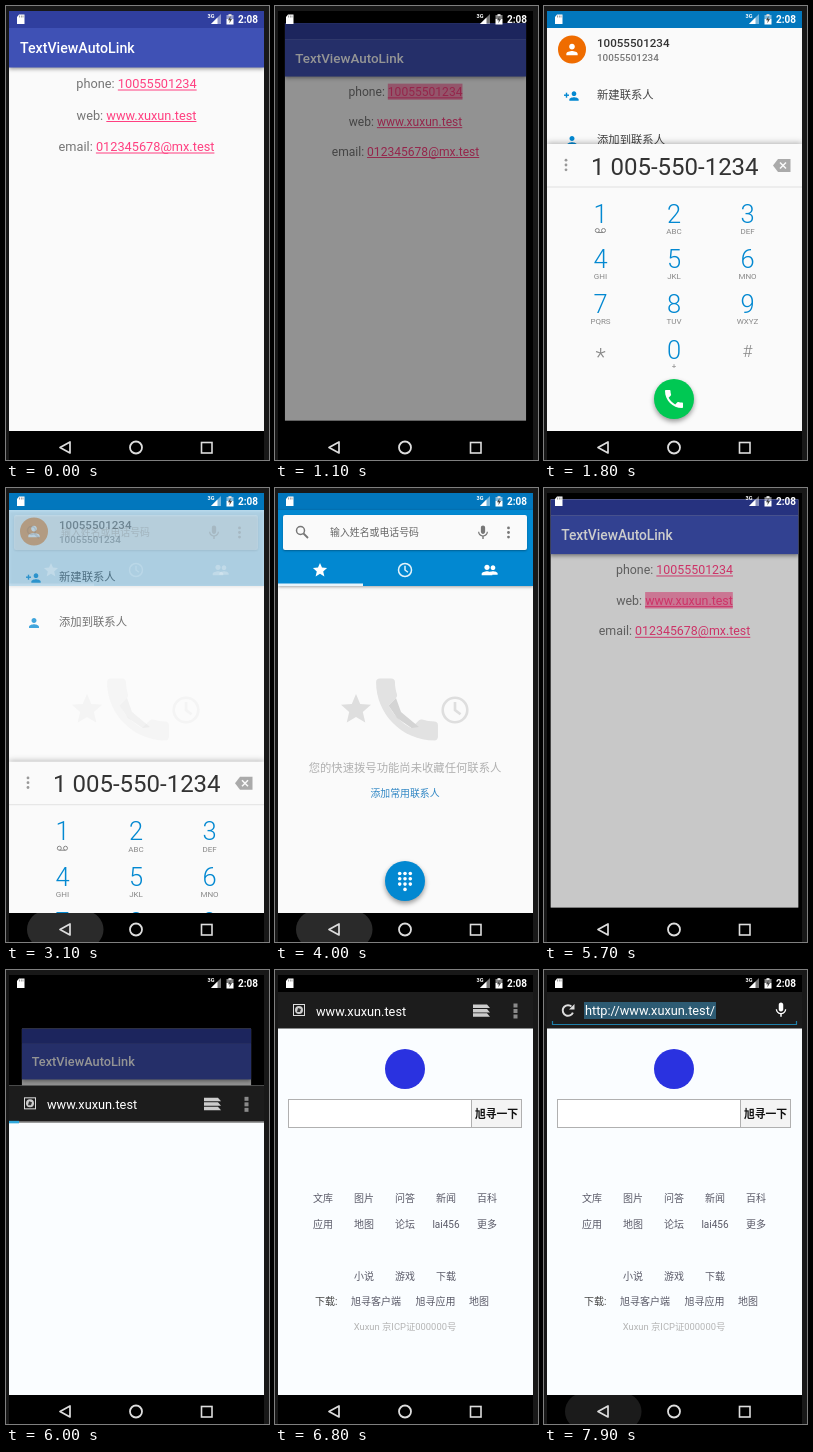
Recreate the animation shown at these times as an HTML page with a canvas. Size 263 px wide and 454 px high, loop 8 s.

```html
<!DOCTYPE html>
<html lang="zh">
<head>
<meta charset="utf-8">
<title>TextViewAutoLink</title>
<style>
html, body { margin: 0; width: 263px; height: 454px; overflow: hidden; background: #181818; }
canvas { display: block; width: 263px; height: 454px; }
</style>
</head>
<body>
<canvas id="stage"></canvas>
<script>
const W = 263, H = 454, LOOP = 8000, STEP = 100;
const FONT = 'Roboto, "Noto Sans CJK SC", "Noto Sans CJK", sans-serif';
const PHONE = '10055501234', PHONE_SPACED = '1 005-550-1234';
const SITE = 'www.xuxun.test', MAIL = '012345678@mx.test';
const BLUE = '#0288d1', PAPER = '#fafafa';

const canvas = document.getElementById('stage');
const c = canvas.getContext('2d');
const dpr = window.devicePixelRatio || 1;
canvas.width = W * dpr;
canvas.height = H * dpr;

// 24-unit icons
const ICON = {
  phone: new Path2D('M6.62 10.79c1.44 2.83 3.76 5.14 6.59 6.59l2.2-2.2c.27-.27.67-.36 1.02-.24 1.12.37 2.33.57 3.57.57.55 0 1 .45 1 1V20c0 .55-.45 1-1 1-9.39 0-17-7.61-17-17 0-.55.45-1 1-1h3.5c.55 0 1 .45 1 1 0 1.25.2 2.45.57 3.57.11.35.03.74-.25 1.02l-2.2 2.2z'),
  star: new Path2D('M12 17.27L18.18 21l-1.64-7.03L22 9.24l-7.19-.61L12 2 9.19 8.63 2 9.24l5.46 4.73L5.82 21z'),
  person: new Path2D('M12 12c2.21 0 4-1.79 4-4s-1.79-4-4-4-4 1.79-4 4 1.79 4 4 4zm0 2c-2.67 0-8 1.34-8 4v2h16v-2c0-2.66-5.33-4-8-4z'),
  mic: new Path2D('M12 14c1.66 0 3-1.34 3-3V5c0-1.66-1.34-3-3-3S9 3.34 9 5v6c0 1.66 1.34 3 3 3zm5.3-3c0 3-2.54 5.1-5.3 5.1S6.7 14 6.7 11H5c0 3.41 2.72 6.23 6 6.72V21h2v-3.28c3.28-.48 6-3.3 6-6.72h-1.7z')
};

const clamp = v => Math.max(0, Math.min(1, v));
const ramp = (t, a, b) => clamp((t - a) / (b - a));

function rect(x, y, w, h, fill) {
  c.fillStyle = fill;
  c.fillRect(x, y, w, h);
}
function disc(x, y, r, fill) {
  c.fillStyle = fill;
  c.beginPath();
  c.arc(x, y, r, 0, 7);
  c.fill();
}
function ring(x, y, r, color, width) {
  c.strokeStyle = color;
  c.lineWidth = width;
  c.beginPath();
  c.arc(x, y, r, 0, 7);
  c.stroke();
}
function poly(points, color, width, open) {
  c.beginPath();
  points.forEach(p => c.lineTo(p[0], p[1]));
  if (!open) c.closePath();
  if (width) {
    c.strokeStyle = color;
    c.lineWidth = width;
    c.stroke();
  } else {
    c.fillStyle = color;
    c.fill();
  }
}
function pill(x, y, w, h, r, fill) {
  c.fillStyle = fill;
  c.beginPath();
  c.roundRect(x, y, w, h, r);
  c.fill();
}
function text(s, x, y, size, color, weight = 400, align = 'left') {
  c.font = `${weight} ${size}px ${FONT}`;
  c.textAlign = align;
  c.fillStyle = color;
  c.fillText(s, x, y);
}
function label(s, x, y, size, color, weight) {
  text(s, x, y, size, color, weight, 'center');
}
function icon(name, x, y, size, color) {
  c.save();
  c.translate(x - size / 2, y - size / 2);
  c.scale(size / 24, size / 24);
  c.fillStyle = color;
  c.fill(ICON[name]);
  c.restore();
}
function shadow(color, blur, y, draw) {
  c.save();
  c.shadowColor = color;
  c.shadowBlur = blur * dpr;
  c.shadowOffsetY = y * dpr;
  draw();
  c.restore();
}
function dots(x, y, gap, r, color) {
  for (let i = -1; i < 2; i++) disc(x, y + i * gap, r, color);
}
function clock(x, y, r, color, width) {
  ring(x, y, r, color, width);
  poly([[x, y - r * .65], [x, y], [x + r * .45, y + r * .35]], color, width, true);
}
function faded(alpha, draw) {
  if (alpha <= 0) return;
  c.save();
  c.globalAlpha *= alpha;
  draw();
  c.restore();
}
function shifted(dy, draw) {
  c.save();
  c.translate(0, dy);
  draw();
  c.restore();
}

function linkLine(name, link, y, lit) {
  c.font = `400 12.75px ${FONT}`;
  const lead = c.measureText(name).width, w = c.measureText(link).width;
  const x = 130.5 - (lead + w) / 2;
  if (lit) rect(x + lead, y - 13, w, 17, 'rgba(255,64,129,.55)');
  text(name, x, y, 12.75, '#757575');
  text(link, x + lead, y, 12.75, '#ff4081');
  rect(x + lead, y + 1.5, w, 1, '#ff4081');
}

function linkApp(lit) {
  rect(3, 5, 255, 420, PAPER);
  shadow('rgba(0,0,0,.4)', 4, 1.5, () => rect(3, 22, 255, 39.5, '#3f51b5'));
  rect(3, 5, 255, 17, '#303f9f');
  text('TextViewAutoLink', 14, 47, 14.17, '#fff', 500);
  linkLine('phone: ', PHONE, 82, lit === 1);
  linkLine('web: ', SITE, 113.5, lit === 2);
  linkLine('email: ', MAIL, 145, false);
}

// The app seen behind another window: shrunk, lowered and darkened
function backApp(scale, dy, light, lit) {
  c.save();
  c.translate(130.5, 231 + dy);
  c.scale(scale, scale);
  c.translate(-130.5, -231);
  c.beginPath();
  c.rect(3, 5, 255, 420);
  c.clip();
  linkApp(lit);
  rect(3, 5, 255, 420, `rgba(0,0,0,${1 - light})`);
  c.restore();
}

function results() {
  rect(3, 22, 255, 403, PAPER);
  disc(28, 43.5, 14, '#ef6c00');
  icon('person', 28, 43.5, 17, '#fff');
  text(PHONE, 53, 41, 11.6, '#333', 500);
  text(PHONE, 53, 54.5, 9.9, '#777', 500);
  icon('person', 30, 90, 14, BLUE);
  rect(20, 88.5, 5, 1.4, BLUE);
  rect(21.8, 86.7, 1.4, 5, BLUE);
  text('新建联系人', 53, 93, 11.33, '#444');
  icon('person', 28, 135, 15, BLUE);
  text('添加到联系人', 53, 138, 11.33, '#444');
}

function fab(color, size = 1) {
  shadow('rgba(0,0,0,.4)', 5, 2.5, () => disc(130, 393, 20 * size, color));
}

function dialpad() {
  shadow('rgba(0,0,0,.3)', 6, -1, () => rect(3, 138, 255, 290, PAPER));
  dots(22, 159, 4.8, 1.4, '#999');
  text(PHONE_SPACED, 47, 168.5, 24, '#333');
  poly([[229, 159.5], [234, 153], [246.5, 153], [246.5, 166], [234, 166]], '#aaa');
  poly([[236, 156.5], [242, 162.5]], PAPER, 1.5);
  poly([[242, 156.5], [236, 162.5]], PAPER, 1.5);
  rect(3, 180.5, 255, 1, '#e2e2e2');

  const letters = ['', 'ABC', 'DEF', 'GHI', 'JKL', 'MNO', 'PQRS', 'TUV', 'WXYZ'];
  letters.forEach((s, i) => {
    const x = 56.5 + i % 3 * 73.5, y = 216.5 + Math.floor(i / 3) * 45.3;
    label(i + 1, x, y, 25.5, BLUE, 300);
    label(s, x, y + 11.3, 8, '#888');
  });
  ring(53.3, 224.5, 2, '#888', 1);
  ring(59.5, 224.5, 2, '#888', 1);
  rect(53.3, 226, 6.2, 1, '#888');
  label('*', 56.5, 359, 24, '#888', 300);
  label('0', 130, 352.5, 25.5, BLUE, 300);
  label('+', 130, 363, 8, '#888');
  label('#', 203.5, 351, 17, '#888', 300);
  fab('#00c853');
  icon('phone', 130, 393, 24, '#fff');
}

function favourites(fabSize) {
  rect(3, 22, 255, 403, PAPER);
  shadow('rgba(0,0,0,.35)', 3, 1, () => rect(3, 22, 255, 76, BLUE));
  shadow('rgba(0,0,0,.3)', 2, 1, () => pill(8, 27, 244, 35, 2, PAPER));
  ring(25.5, 42.5, 4, '#777', 1.5);
  poly([[28.5, 45.5], [33, 50]], '#777', 1.8, true);
  text('输入姓名或电话号码', 55, 48, 9.9, '#666');
  icon('mic', 208, 44.5, 17, '#777');
  dots(233.5, 44.5, 4.6, 1.4, '#777');

  icon('star', 45, 82, 17, '#fff');
  clock(130, 82, 6.5, '#e5f3fa', 1.5);
  icon('person', 218, 82, 14, '#fff');
  icon('person', 212, 82, 16, '#fff');
  rect(3, 95.5, 85, 2.5, '#e8f4fb');

  icon('star', 81, 221, 36, '#dedede');
  icon('phone', 132, 221.5, 82.5, '#e2e2e2');
  poly([[113.5, 217.5], [121, 210], [126, 224], [144, 239], [136.5, 240], [122, 230]], '#d4d4d4');
  clock(180, 222, 12.3, '#dedede', 2.6);
  label('您的快速拨号功能尚未收藏任何联系人', 130, 283.5, 11.33, '#b0b0b0');
  label('添加常用联系人', 130, 308.5, 9.9, '#2f86c4');

  if (fabSize <= 0) return;
  fab(BLUE, fabSize);
  for (let i = 0; i < 10; i++) {
    const col = i < 9 ? i % 3 - 1 : 0, row = Math.floor(i / 3);
    disc(130 + col * 5.3 * fabSize, 393 + (row * 5.3 - 7.5) * fabSize, 1.8 * fabSize, '#fff');
  }
}

function dialer(t) {
  rect(3, 5, 255, 17, '#0277bd');
  const drop = ramp(t, 2800, 3300);
  const swap = ramp(t, 3000, 3400);
  if (swap < 1) results();
  faded(swap, () => favourites(ramp(t, 3200, 3500)));
  if (drop < 1) {
    c.save();
    c.beginPath();
    c.rect(3, 22, 255, 403);
    c.clip();
    shifted(292 * drop ** 1.5, dialpad);
    c.restore();
  }
}

function page(t) {
  if (t >= 6700) disc(130, 99, 20, '#2a32e0');
  rect(13.5, 130, 183, 28, '#fff');
  rect(196.5, 130, 50, 28, '#f4f4f4');
  c.strokeStyle = '#b0b0b0';
  c.lineWidth = 1;
  c.strokeRect(13.5, 129.5, 183, 28);
  c.strokeRect(196.5, 129.5, 50, 28);
  label('旭寻一下', 221.5, 148, 10.8, '#111', 700);

  const row = (items, first, y) => items.split(' ').forEach((s, i) =>
    label(s, 48 + (first + i) * 41, y, 10, '#5a5a68'));
  row('文库 图片 问答 新闻 百科', 0, 231.5);
  row('应用 地图 论坛 lai456 更多', 0, 257.5);
  row('小说 游戏 下载', 1, 309.5);
  text('下载:', 40, 334.5, 10, '#444');
  text('旭寻客户端', 76, 334.5, 10, '#5a5a68');
  text('旭寻应用', 140.5, 334.5, 10, '#5a5a68');
  text('地图', 194, 334.5, 10, '#5a5a68');
  label('Xuxun 京ICP证000000号', 130, 359.5, 9.4, '#b4b4b4');
}

function typingBar() {
  c.strokeStyle = '#ddd';
  c.lineWidth = 2;
  c.beginPath();
  c.arc(24, 40.5, 5.3, .4, 5.4);
  c.stroke();
  poly([[25, 39.5], [30.5, 39.5], [30.5, 34]], '#ddd');
  rect(40, 32, 132, 17, '#2d5b73');
  text('http://' + SITE + '/', 41, 45, 12.75, '#fff');
  poly([[8.5, 51], [8.5, 54.5], [252.5, 54.5], [252.5, 51]], '#1f7fa8', 1.2, true);
  icon('mic', 237, 40, 18, '#fff');
}

function siteBar() {
  c.strokeStyle = '#ddd';
  c.lineWidth = 1;
  c.strokeRect(18.5, 34.5, 11, 11);
  disc(24, 40, 4, '#ccc');
  poly([[22, 42], [23, 38], [26, 39], [25, 42]], '#333');
  text(SITE, 41, 45.5, 12.75, '#fff');
  for (let i = 0; i < 3; i++) {
    const y = 34.5 + i * 4.4;
    poly([[198, y], [212, y], [215, y + 3.5], [198, y + 3.5]], '#ccc');
  }
  for (let i = 0; i < 3; i++) rect(238.5, 33.5 + i * 5.5, 4, 4, '#8a8a8a');
}

function browser(t) {
  rect(3, 22, 255, 403, '#fafdff');
  rect(3, 22, 255, 36.5, '#1c1c1c');
  if (t >= 7600) typingBar(); else siteBar();
  if (t < 6400) {
    rect(3, 58, 255, 1.5, '#888');
    rect(3, 57.5, 10 + 245 * ramp(t, 6000, 6400), 2.5, '#2fa8dc');
  }
  if (t >= 6600) page(t);
}

// A new window rises over the link app
function openOver(u, lit, draw) {
  const shrink = 1 - (1 - ramp(u, -100, 300)) ** 1.1;
  const sink = 31 * (Math.max(0, u - 100) / 200) ** 1.5;
  const light = u < 100 ? .8 : .58;
  backApp(1 - .1 * shrink, sink, light, lit);
  const rise = ramp(u, 100, 700);
  if (rise > 0) shifted(410 * (1 - rise) ** 3.65, draw);
}

// The dialer falls away and the link app comes back
function closeDialer(t) {
  const grow = 1 - .1 * (1 - ramp(t, 4100, 4900)) ** 1.5;
  backApp(grow, 0, .58 + .42 * ramp(t, 4700, 4900), 0);
  const fall = ramp(t, 4100, 4600);
  if (fall < 1) shifted(450 * fall ** 2, () => dialer(t));
}

function statusBar() {
  poly([[11, 11], [13, 8.5], [18.5, 8.5], [18.5, 18], [11, 18]], '#fff');
  for (let i = 0; i < 3; i++) rect(13.2 + i * 1.7, 9.5, .8, 2, '#888');
  text('3G', 201.5, 12, 5.5, '#fff', 700);
  poly([[205, 18], [215, 8], [215, 18]], 'rgba(255,255,255,.45)');
  poly([[205, 18], [211.5, 11.5], [211.5, 18]], '#fff');
  rect(222.5, 8, 3, 2, '#ccc');
  rect(220.5, 9, 7, 4, 'rgba(255,255,255,.5)');
  rect(220.5, 13, 7, 5.5, '#fff');
  poly([[224.6, 10], [222, 14.3], [223.8, 14.3], [223.4, 17.3], [226, 13], [224.2, 13]], '#444');
  text('2:08', 232, 17, 10, '#fff', 700);
}

function press(t, start, end, peak) {
  return peak * Math.min(ramp(t, start - 100, start + 200), 1 - ramp(t, end - 300, end));
}

function navBar(t) {
  rect(3, 425, 255, 29, '#000');
  const glow = press(t, 2800, 3500, .165) + press(t, 3800, 4600, .165) + press(t, 7600, 8600, .105);
  c.save();
  c.beginPath();
  c.rect(3, 425, 255, 29);
  c.clip();
  if (glow > 0) pill(21, 423, 76.5, 37, 18.5, `rgba(255,255,255,${glow})`);
  c.restore();
  c.lineJoin = 'round';
  poly([[54, 441.5], [64, 436], [64, 447]], '#ddd', 1.7);
  c.lineJoin = 'miter';
  ring(130, 441.5, 6, '#ddd', 1.8);
  c.strokeStyle = '#ddd';
  c.lineWidth = 1.6;
  c.strokeRect(195.5, 436.5, 10.5, 10.5);
}

function screen(t) {
  if (t < 1000) linkApp(t >= 700 ? 1 : 0);
  else if (t < 1700) openOver(t - 1000, 1, () => dialer(t));
  else if (t < 4100) dialer(t);
  else if (t < 4900) closeDialer(t);
  else if (t < 5700) linkApp(t >= 5400 ? 2 : 0);
  else if (t < 6400) openOver(t - 5700, 2, () => browser(t));
  else browser(t);
}

function frame(now) {
  const t = Math.floor(now % LOOP / STEP) * STEP;
  c.setTransform(dpr, 0, 0, dpr, 0, 0);
  rect(0, 0, W, H, '#181818');
  rect(3, 5, 255, 449, '#000');
  c.save();
  c.beginPath();
  c.rect(3, 5, 255, 420);
  c.clip();
  screen(t);
  c.restore();
  navBar(t);
  statusBar();
  requestAnimationFrame(frame);
}
requestAnimationFrame(frame);
</script>
</body>
</html>
```
